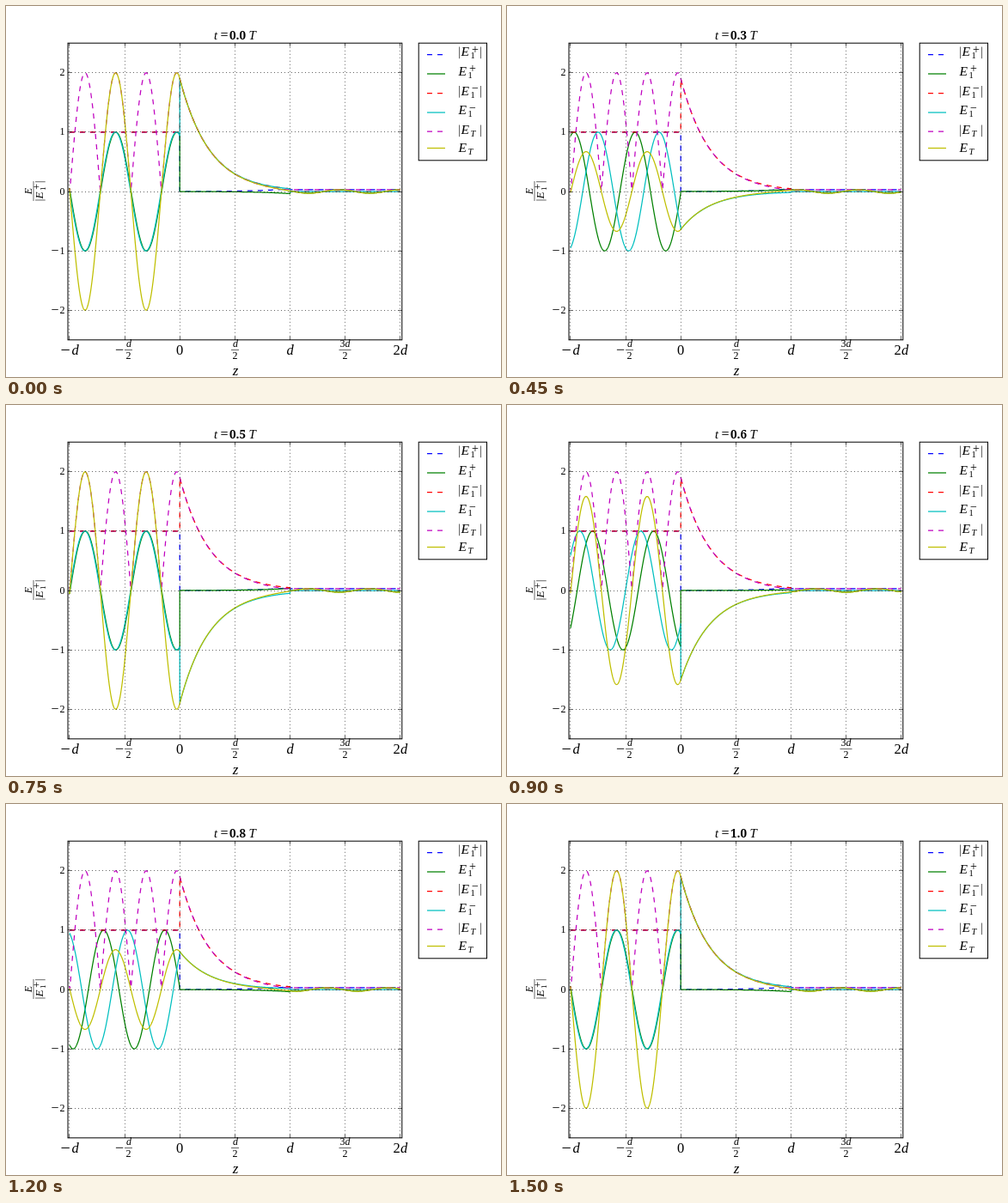
Recreate the animation shown at these times as an HTML page. Size 576 by 432 pixels, loop 1650 ms.

```html
<!DOCTYPE html>
<html>
<head>
<meta charset="utf-8">
<style>
html, body { margin: 0; width: 100%; height: 100%; overflow: hidden; background: #fff; }
svg { display: block; }
text { font-family: "Liberation Serif", "Noto Serif", serif; }
path, line, rect { fill: none; stroke: #000; }
.it { font-style: italic; }
.clock { font: bold 13.5px "Noto Serif", serif; }
.curve { stroke-width: 1.25; stroke-linejoin: round; }
.dash { stroke-dasharray: 6 6; }
.grid { stroke-width: .6; stroke-dasharray: 1 3; }
.thin { stroke-width: .6; }
</style>
</head>
<body>
<svg id="stage" width="576" height="432" viewBox="0 0 576 432"></svg>
<script>
const stage = document.getElementById('stage');
const LEFT = 72, RIGHT = 460.8, TOP = 43.2, BOTTOM = 388.8;
const px = z => 202.2 + 128.3 * z;
const py = v => 216 - 69.12 * v;
const snap = v => Math.floor(v) + .5;

function add(tag, attrs, parent = stage) {
  const el = document.createElementNS('http://www.w3.org/2000/svg', tag);
  for (const key in attrs) el.setAttribute(key, attrs[key]);
  parent.appendChild(el);
  return el;
}
function text(str, x, y, size, cls = '', anchor = 'start', parent = stage) {
  const el = add('text', { x, y, 'font-size': size, class: cls, 'text-anchor': anchor }, parent);
  el.textContent = str;
  return el;
}
const line = (x1, y1, x2, y2, cls = '', parent = stage) =>
  add('line', { x1, y1, x2, y2, class: cls }, parent);

// Standing wave, evanescent gap (depth d = 1), transmitted wave
const K = 11.34, DECAY = 3.7, START = .028, SAMPLES = 333;
const A = Math.atan(DECAY / K), B = Math.PI / 2 - A;
const GAP = 2 * Math.cos(A), EDGE = GAP * Math.exp(-DECAY), THROUGH = 2 * EDGE * Math.cos(B);

// Each medium gives [amplitude, phase] of the forward and backward parts
const media = [
  z => [[1, -K * z - A], [1, K * z + A]],
  z => [[EDGE * Math.exp(DECAY * (z - 1)), -2 * B], [GAP * Math.exp(-DECAY * z), 0]],
  z => [[THROUGH, -B - K * (z - 1)], [0, 0]]
];
const real = ([amp, ph], t) => amp * Math.cos(ph + t);
const sum = (f, b, t) => real(f, t) + real(b, t);

const curves = [
  { color: '#0000ff', dash: true, value: f => f[0] },
  { color: '#008000', value: (f, b, t) => real(f, t) },
  { color: '#ff0000', dash: true, value: (f, b) => b[0] },
  { color: '#00bfbf', value: (f, b, t) => real(b, t) },
  { color: '#bf00bf', dash: true, value: (f, b) => Math.hypot(sum(f, b, 0), sum(f, b, Math.PI / 2)) },
  { color: '#bfbf00', value: sum }
];

function trace(value, t) {
  const pts = [];
  media.forEach((parts, m) => {
    for (let i = 0; i <= SAMPLES; i++) {
      const z = m - 1 + i / SAMPLES;
      const [f, b] = parts(z);
      pts.push(px(z).toFixed(2) + ' ' + py(value(f, b, t)).toFixed(2));
    }
  });
  return 'M' + pts.join('L');
}
const stroke = (c, d = '') =>
  add('path', { d, class: c.dash ? 'curve dash' : 'curve', style: 'stroke:' + c.color });

for (const c of curves) c.path = stroke(c);

// Grid, ticks and frame
for (let i = -2; i <= 4; i++) {
  const x = snap(px(i / 2));
  line(x, BOTTOM, x, TOP, 'grid');
  line(x, BOTTOM, x, BOTTOM - 4, 'thin');
  line(x, TOP, x, TOP + 4, 'thin');
}
for (let v = -2; v <= 2; v++) {
  const y = snap(py(v));
  line(LEFT, y, RIGHT, y, 'grid');
  line(LEFT, y, LEFT + 4, y, 'thin');
  line(RIGHT, y, RIGHT - 4, y, 'thin');
  text(Math.abs(v), 68.5, y + 3.5, 12, '', 'end');
  if (v < 0) text('−', 52.5, y + 4.3, 16);
}
add('rect', { x: LEFT, y: TOP, width: RIGHT - LEFT, height: BOTTOM - TOP });

// Horizontal axis labels
function half(x, count = '') {
  const w = count ? 7 : 4.5;
  if (count) text(count, x - 6, 397, 12);
  text('d', x + w - 1, 397, 12, 'it', 'end');
  line(x - w, 400.5, x + w, 400.5, 'thin');
  text('2', x, 411, 12, '', 'middle');
}
text('−', 63.5, 407, 20);
text('d', 76.5, 406, 16.5, 'it');
text('−', 127, 406, 18);
half(142.5);
text('0', 202, 406, 16.5, '', 'middle');
half(266.5);
text('d', 330.5, 406, 16.5, 'it', 'middle');
half(394.5, '3');
text('2', 450.5, 406, 16.5);
text('d', 459, 406, 16.5, 'it');
text('z', 267, 429.5, 17, 'it', 'middle');

function symbol(x, y, size, sub, sup, bars, parent = stage) {
  const s = size / 14, e = bars ? x + 3 * s : x;
  if (bars) for (const bx of [x + 1, x + 26 * s])
    line(bx, y - 10.5 * s, bx, y + 3.2 * s, 'thin', parent);
  text('E', e, y, 15.5 * s, 'it', 'start', parent);
  text(sub, e + 11 * s, y + 3 * s, 10.5 * s, sub === 'T' ? 'it' : '', 'start', parent);
  if (sup) text(sup, e + 12.5 * s, y - 3.5 * s, 14 * s, '', 'start', parent);
}

// Vertical axis label
const side = add('g', { transform: 'translate(32 215.5) rotate(-90)' });
text('E', 0, -2.5, 12, 'it', 'middle', side);
line(-11.5, 0, 11.5, 0, 'thin', side);
symbol(-11.5, 11, 12, '1', '+', true, side);

// Legend
add('rect', { x: 480.2, y: 43.2, width: 79.3, height: 136.6, style: 'fill:#fff' });
const rows = [[56.5, 58], [79, 80.5], [101.5, 103.5], [124, 126], [146, 149], [165.5, 169.5]];
rows.forEach(([y, base], i) => {
  stroke(curves[i], `M490 ${y}H511`);
  symbol(526.5, base, 14, i < 4 ? '1' : 'T', ['+', '−'][i >> 1], i % 2 === 0);
});

// Title
text('t', 242, 38.5, 14.5, 'it');
text('=', 249.5, 39, 16);
const clock = text('', 260, 38.5, 13.5, 'clock');
text('T', 282.5, 38.5, 15, 'it');

let shown = -1;
function frame(now) {
  const step = Math.floor(now / 150) % 11;
  if (step !== shown) {
    shown = step;
    clock.textContent = (step / 10).toFixed(1);
    const t = 2 * Math.PI * step / 10 + START;
    for (const c of curves) c.path.setAttribute('d', trace(c.value, t));
  }
  requestAnimationFrame(frame);
}
frame(performance.now());
</script>
</body>
</html>
```
